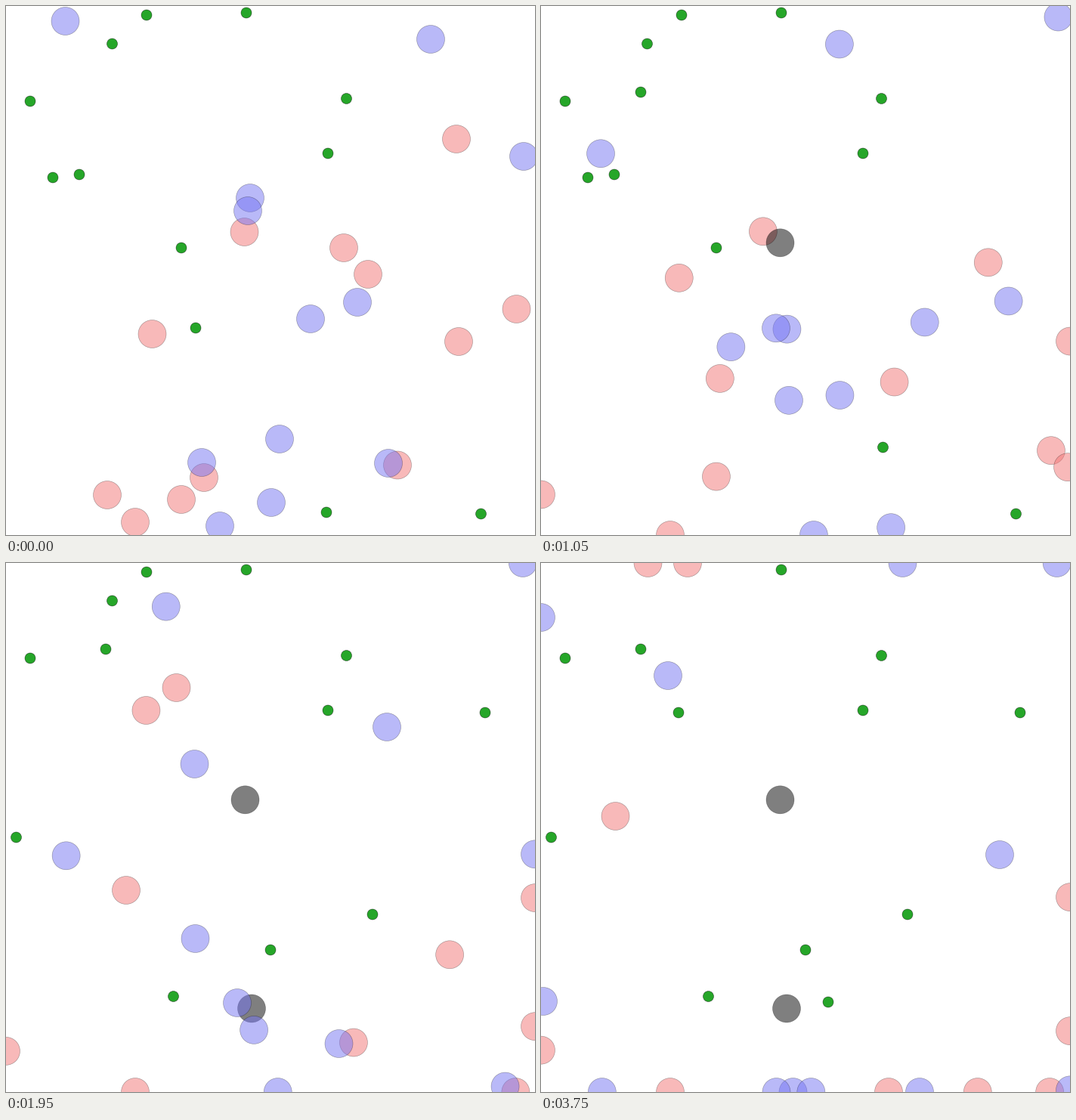
A matplotlib script that plays this animation: 700 by 700 pixels, repeating every 3.9 s.

```python
import numpy as np
import matplotlib.pyplot as plt
from matplotlib.animation import FuncAnimation
from matplotlib.patches import Circle

SIZE, DPI = 700, 100
FRAMES, STEP_MS = 26, 150
AGENT_R, FOOD_R = 18.5, 7
INERTIA = 0.62
MEALS_OUT = 12

RED, BLUE, BLACK = (243, 117, 117), (117, 117, 243), (0, 0, 0)
GREEN = (38, 166, 41)

# Straight movers: x, y, vx, vy (pixels per frame at full speed).
RED_RUNNERS = [
    (596, 176, -0.78, 30.1), (315.5, 299, 1, 14.4), (675.5, 401, -0.1, 34.5),
    (599, 444, 32, -0.08), (134, 647, -32.2, -0.1), (171, 683, 0, 28), (518, 607.5, 33, 0.5),
]
BLUE_RUNNERS = [
    (78.5, 20, 0.1, 32.3), (562, 44, -30.8, 1.2), (685, 199, -0.1, -34),
    (323, 254, 0.45, 32), (362, 573, -0.2, 31.8), (283, 688, 33.2, 0.4),
]
# Turning movers: a few key points as frame, x, y.
RED_WANDERERS = [
    [(0, 447, 320), (5, 335, 321), (13, 225.5, 165), (25, 141.5, -70)],
    [(0, 479, 355), (9, 464.5, 545), (25, 460, 850)],
    [(0, 193.5, 434), (5, 185, 395), (17, 189, 94), (25, 194, -30)],
    [(0, 262, 624), (5, 253.5, 528), (13, 159, 433), (25, 98.5, 335)],
    [(0, 232, 653), (5, 217.5, 628), (9, 260.5, 616), (12, 325, 589.5)],
]
BLUE_WANDERERS = [
    [(0, 320, 271), (13, 306, 582), (25, 311.5, 850)],
    [(0, 465, 392), (9, 669.5, 389.5), (17, 850, 383), (21, 674, 387), (25, 607, 386)],
    [(0, 403, 414), (5, 393, 469), (9, 404, 564), (13, 440.5, 636), (25, 501, 840)],
    [(0, 259, 604), (9, 250, 392), (13, 249.5, 266), (17, 232, 200), (25, 168, 149)],
    [(0, 506, 605), (13, 504, 217), (25, 478.5, -180)],
    [(0, 351, 657), (5, 341, 555), (13, 250.5, 497), (17, 163, 515), (25, 3, 580)],
]
CAUGHT = {1: 2, 11: 12}  # red index: frame

# The first twelve are laid out at the start; each meal brings in the next.
FOOD = [
    (186, 12), (318, 9), (140.5, 50), (32, 126), (450.5, 122.5), (426, 195),
    (97, 223), (62, 227), (232, 320), (251, 426), (424, 670), (628.5, 672),
    (452.5, 584), (132, 114), (174.5, 180), (485, 465), (634, 198), (13.5, 363),
    (221.5, 573.5), (350, 512), (92, 558), (182, 198), (380, 581),
]


def travel(k):
    """Distance covered after k steps when speeding up from rest to speed 1."""
    return k - INERTIA * (1 - INERTIA ** k) / (1 - INERTIA)


TIME = travel(np.arange(FRAMES, dtype=float))


def run(x, y, vx, vy):
    return np.clip(np.array([x + vx * TIME, y + vy * TIME]).T, 0, SIZE)


def wander(keys):
    """Smooth track through the key points, held inside the walls."""
    keys = np.array(keys, float)
    s, p = travel(keys[:, 0]), keys[:, 1:]
    m = np.gradient(p, s, axis=0, edge_order=2)
    i = np.clip(np.searchsorted(s, TIME, side="right") - 1, 0, len(p) - 2)
    h = (s[i + 1] - s[i])[:, None]
    u = np.minimum((TIME - s[i])[:, None] / h, 1)
    track = ((1 + 2 * u) * (1 - u) ** 2 * p[i] + u * (1 - u) ** 2 * h * m[i]
             + u * u * (3 - 2 * u) * p[i + 1] + u * u * (u - 1) * h * m[i + 1])
    return np.clip(track, 0, SIZE)


def serve(tracks):
    """Indices of the food on stage in each frame; touching agents eat it."""
    out, fresh, served = list(range(MEALS_OUT)), MEALS_OUT, []
    for k in range(FRAMES):
        agents = np.array([t[k] for t in tracks])
        left = [n for n in out
                if np.hypot(*(agents - FOOD[n]).T).min() > AGENT_R + FOOD_R]
        eaten = len(out) - len(left)
        out = left + list(range(fresh, min(fresh + eaten, len(FOOD))))
        fresh += eaten
        served.append(set(out))
    return served


red_tracks = [run(*r) for r in RED_RUNNERS] + [wander(w) for w in RED_WANDERERS]
blue_tracks = [run(*r) for r in BLUE_RUNNERS] + [wander(w) for w in BLUE_WANDERERS]
for n, when in CAUGHT.items():
    red_tracks[n][when:] = red_tracks[n][when]
served = serve(red_tracks + blue_tracks)

fig = plt.figure(figsize=(SIZE / DPI, SIZE / DPI), dpi=DPI, facecolor="white")
ax = fig.add_axes([0, 0, 1, 1])
ax.set_xlim(0, SIZE)
ax.set_ylim(SIZE, 0)
ax.axis("off")


def rgba(rgb, alpha):
    return tuple(c / 255 for c in rgb) + (alpha,)


def disc(xy, radius, rgb, alpha, edge_alpha, z):
    return ax.add_patch(Circle(xy, radius, facecolor=rgba(rgb, alpha), zorder=z,
                               edgecolor=rgba(BLACK, edge_alpha), linewidth=0.6 * 72 / DPI))


food = [disc(xy, FOOD_R, GREEN, 1, 0.6, 1) for xy in FOOD]
reds = [disc(t[0], AGENT_R, RED, 0.5, 0.35, 2) for t in red_tracks]
blues = [disc(t[0], AGENT_R, BLUE, 0.5, 0.35, 4) for t in blue_tracks]


def draw(k):
    for n, dot in enumerate(food):
        dot.set_visible(n in served[k])
    for dot, track in zip(reds + blues, red_tracks + blue_tracks):
        dot.set_center(track[k])
    for n, when in CAUGHT.items():
        dead = k >= when
        reds[n].set_facecolor(rgba(BLACK if dead else RED, 0.5))
        reds[n].set_zorder(3 if dead else 2)
    return food + reds + blues


anim = FuncAnimation(fig, draw, frames=FRAMES, interval=STEP_MS, repeat=True, repeat_delay=0)
plt.show()
```
